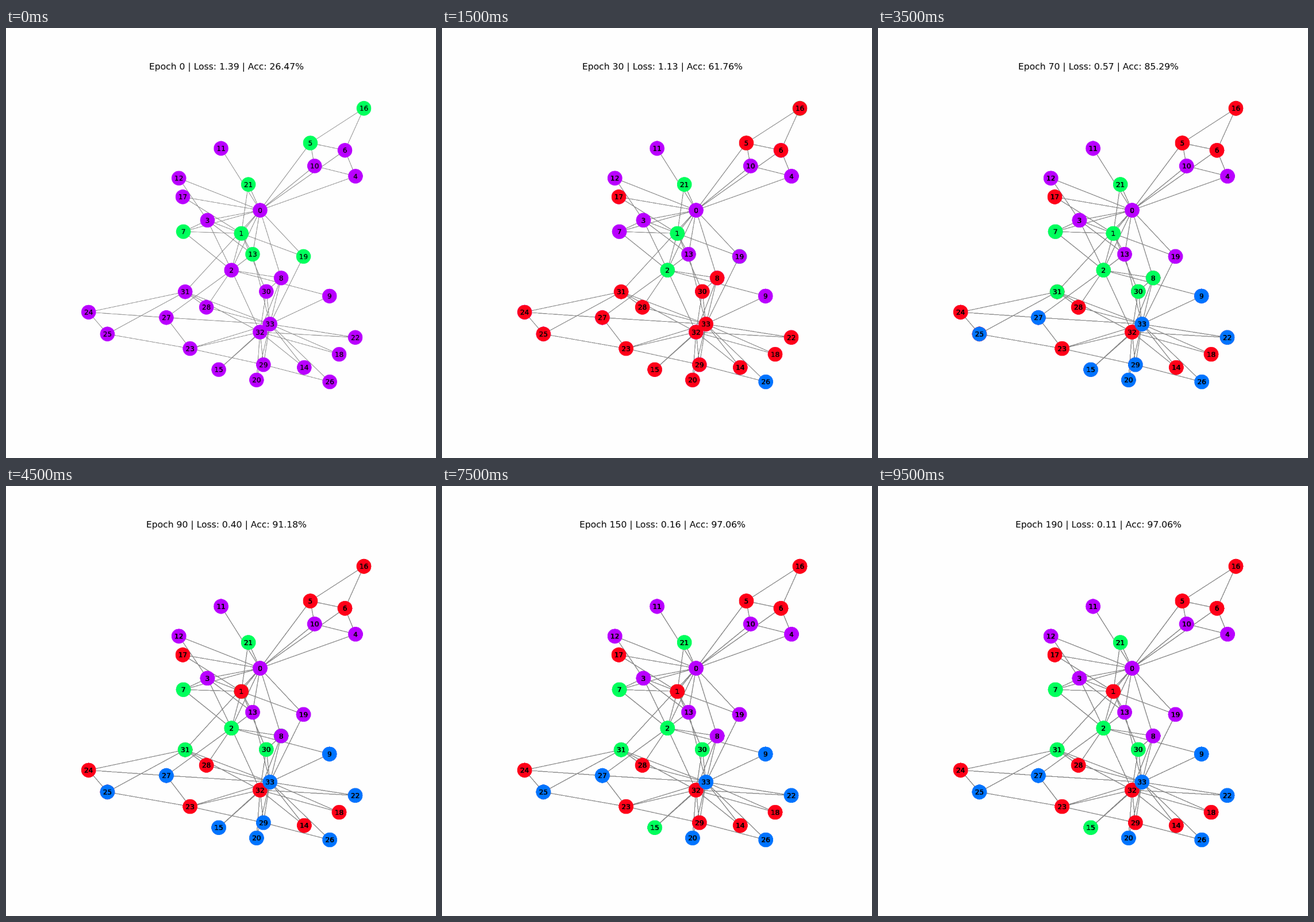
These frames come from a looping animation (748 by 748 pixels, 10 s). An HTML page with a canvas:

```html
<!DOCTYPE html>
<html lang="en">
<head>
<meta charset="utf-8">
<title>Node classification training</title>
<style>
  html, body { margin: 0; width: 100%; height: 100%; overflow: hidden; background: #fefefe; }
  canvas { display: block; width: 100%; height: 100%; }
</style>
</head>
<body>
<canvas id="stage" width="748" height="748"></canvas>
<script>
const SIZE = 748;
const PLOT = 1200;         // the plot is painted larger, then scaled down
const PT = SIZE / 12 / 72; // one typographic point on the 12 inch figure
const STEP_MS = 500;
const STEPS = 20;
const MISSED = 17;         // the one node that is never classified correctly
const COLORS = { r: '#ff0018', g: '#00ff5c', b: '#0074ff', p: '#b900ff' };

const points = [
  [442, 317], [409.4, 357.3], [392.2, 421.2], [350.4, 334.4], [608, 257.8],
  [529.4, 200], [589.6, 212.7], [308.6, 354.2], [478.7, 434.8], [562.8, 466.3],
  [536.8, 240], [374.1, 209.4], [300.7, 261.2], [429, 393.5], [518.8, 590.5],
  [370.1, 594.2], [622.6, 139.7], [307.5, 293.7], [579.6, 567.6], [517.5, 397.4],
  [435.9, 612.3], [421.6, 272.1], [607.6, 538.3], [320.2, 557.6], [143.7, 494.3],
  [176.4, 532.3], [563.2, 615.5], [278.9, 503.7], [348.6, 485.7], [447.8, 585.6],
  [452.8, 458.3], [311.7, 458.8], [441.9, 528.9], [459.2, 515]
];

// Every hub on the left is joined to every spoke on the right.
const stars = [
  [[32, 33], [8, 14, 15, 18, 20, 22, 23, 29, 30, 31]],
  [[33], [9, 13, 19, 26, 27, 28, 32]],
  [[0, 1, 2], [3, 7, 13]],
  [[0, 1], [2, 17, 19, 21]],
  [[0], [1, 4, 5, 6, 8, 10, 11, 12, 31]],
  [[1, 8], [30]],
  [[2], [8, 9, 27, 28, 32]],
  [[3], [7, 12, 13]],
  [[4, 5], [6, 10]],
  [[5, 6], [16]],
  [[23], [25, 27, 29]],
  [[24], [25, 27]],
  [[31], [24, 25, 28]],
  [[26], [29]]
];

// Key moments: the loss and one class letter per node.
const final = 'prgpprrgpbpppprgrrrpbgbrrbbbrrggrb';
const keys = [
  { step: 0, loss: 1.39, classes: 'pgpppgpgpppppgppgppgpgpppppppppppp' },
  { step: 3, loss: 1.13, classes: 'pggpprrprppppprrrrrprgrrrrbrrrrrrr' },
  { step: 5, loss: 0.82, classes: 'pggpprrggbpppprbrrrpbgbrrrbbrbgrrb' },
  { step: 9, loss: 0.40, classes: 'prgpprrgpbpppprbrrrpbgbrrbbbrbggrb' },
  { step: 11, loss: 0.28, classes: final },
  { step: 15, loss: 0.16, classes: final },
  { step: 19, loss: 0.11, classes: final }
];

// Between key moments the loss decays and nodes switch over in a scattered order.
function stateAt(step) {
  const next = Math.max(1, keys.findIndex(key => key.step >= step));
  const a = keys[next - 1], b = keys[next];
  const part = (step - a.step) / (b.step - a.step);
  return {
    loss: a.loss * (b.loss / a.loss) ** part,
    classes: points.map((_, i) => ((i * 0.618) % 1 < part ? b : a).classes[i])
  };
}

const states = Array.from({ length: STEPS }, (_, step) => stateAt(step));

const plot = document.createElement('canvas');
plot.width = plot.height = PLOT;
const pen = plot.getContext('2d');
pen.scale(PLOT / SIZE, PLOT / SIZE);
pen.textAlign = 'center';

const view = document.getElementById('stage').getContext('2d');
view.imageSmoothingQuality = 'high';

function write(text, x, y, pt) {
  pen.fillStyle = '#000';
  pen.font = `${pt * PT}px "DejaVu Sans", sans-serif`;
  pen.fillText(text, x, y);
}

function drawEdges() {
  pen.strokeStyle = '#808080';
  pen.lineWidth = 0.8 * PT;
  for (const [hubs, spokes] of stars) {
    for (const hub of hubs) {
      for (const spoke of spokes) {
        pen.beginPath();
        pen.moveTo(...points[hub]);
        pen.lineTo(...points[spoke]);
        pen.stroke();
      }
    }
  }
}

function drawNodes(classes) {
  points.forEach(([x, y], i) => {
    pen.fillStyle = COLORS[classes[i]];
    pen.beginPath();
    pen.arc(x, y, 14.64 * PT, 0, 2 * Math.PI);
    pen.fill();
  });
}

function drawLabels() {
  points.forEach(([x, y], i) => write(i, x, y + 4.4, 14));
}

function drawTitle(step) {
  const { loss, classes } = states[step];
  const hits = classes.filter((c, i) => c === final[i] && i !== MISSED).length;
  const acc = (100 * hits / points.length).toFixed(2);
  write(`Epoch ${step * 10} | Loss: ${loss.toFixed(2)} | Acc: ${acc}%`, 383.4, 72.3, 18);
}

// The graph is painted over itself at each step, so its soft edges build up.
function paint(step) {
  const passes = [states[0], ...states.slice(0, step + 1)];
  pen.fillStyle = '#fefefe';
  pen.fillRect(0, 0, SIZE, SIZE);
  passes.forEach(drawEdges);
  passes.forEach(state => drawNodes(state.classes));
  passes.forEach(drawLabels);
  drawTitle(step);
  view.drawImage(plot, 0, 0, SIZE, SIZE);
}

let shown = -1;
const start = performance.now();
function tick() {
  const step = Math.floor((performance.now() - start) / STEP_MS) % STEPS;
  if (step !== shown) paint(shown = step);
  requestAnimationFrame(tick);
}
tick();
</script>
</body>
</html>
```
